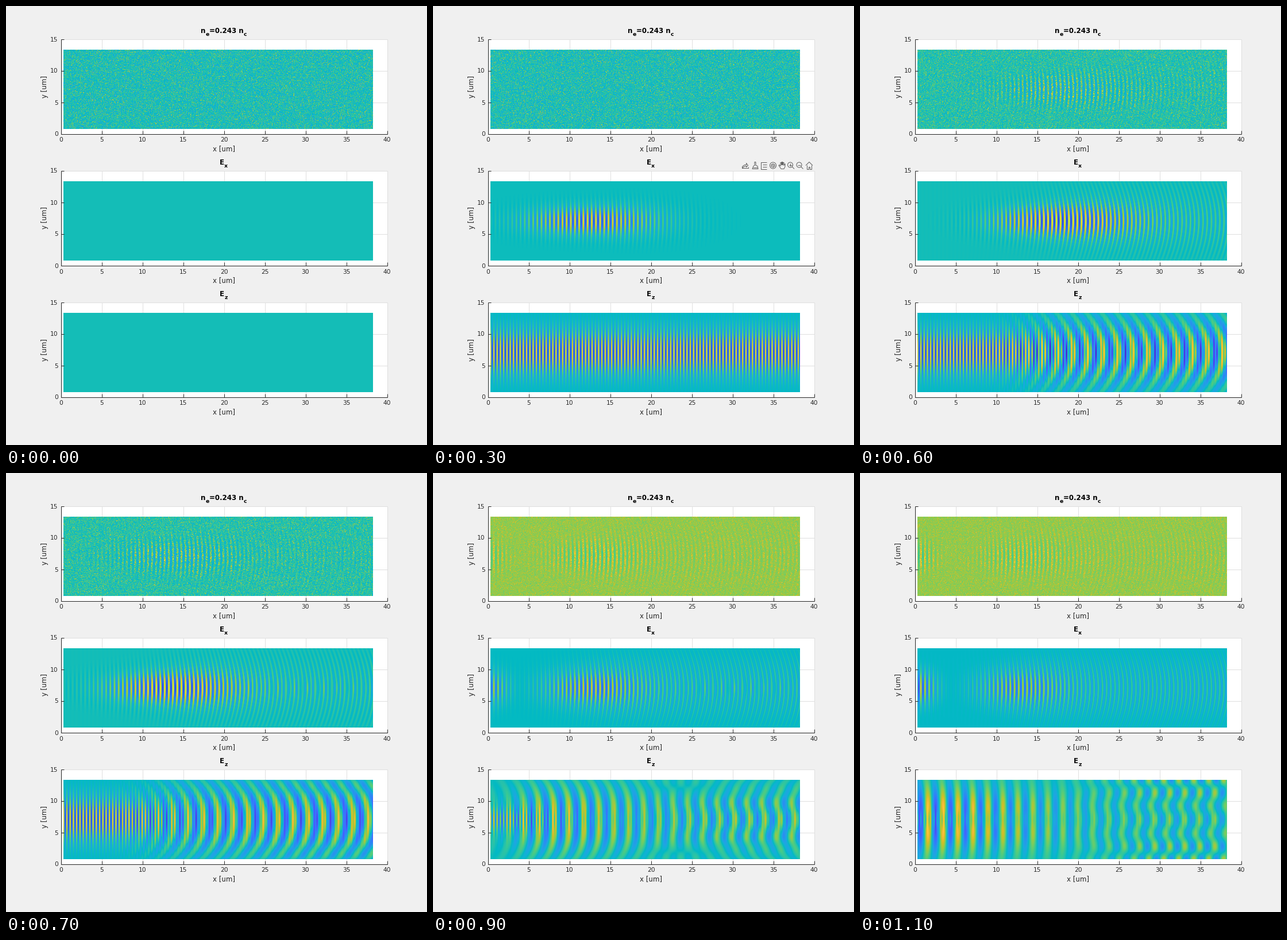
Write a matplotlib script that moves like this. It is 733 px wide and 764 px high and loops after 1200 ms.

```python
import numpy as np
import matplotlib.pyplot as plt
from matplotlib.animation import FuncAnimation
from matplotlib.colors import LinearSegmentedColormap
from matplotlib.patches import Circle, Rectangle

W, H, DPI = 733, 764, 100
PX = 72 / DPI
FRAMES, STEP_MS = 12, 100
LEFT, RIGHT, BOX_H = 95.5, 663.5, 165
TOPS = [57.5 + 229 * k for k in range(3)]
IMG_X, IMG_W, IMG_H = 100, 539, 138
SCALE = (RIGHT - LEFT) / 40
DARK, GRID, ICON = "#262626", "#dfdfdf", "#606060"

plt.rcParams["font.family"] = "DejaVu Sans"
CMAP = LinearSegmentedColormap.from_list("sea", ["#" + c for c in (
    "3e26a8 4332cb 4741e5 4852f4 4563fd 3875fe 2e87f7 2797eb 20a5e3 12b1d6 "
    "02bac3 24c1ae 37c897 57cc7a 81cc59 abc739 d1bf27 f0ba36 fec338 fad62d "
    "f5e924 f9fb15").split()], N=256)

# Wavelengths in pixels: pump, scattered light, plasma wave (k adds up)
PUMP, SCATTER = 5.7, 26.1
PLASMA = 1 / (1 / PUMP - 1 / SCATTER)

px = (IMG_X + np.arange(IMG_W) + .5)[None, :]
x = (px - LEFT) / SCALE
dy = np.abs(np.linspace(6.3, -6.3, IMG_H))[:, None]


def ramp(i, a, b):
    t = np.clip((i - a) / (b - a), 0, 1)
    return t * t * (3 - 2 * t)


def bell(d, w):
    return np.exp(-(d / w) ** 2)


def step(d, w):
    return .5 + .5 * np.tanh(d / w)


def wave(pos, length, peak=0):
    return np.cos(2 * np.pi * (pos - peak) / length)


def plasma_wave(i):
    """Longitudinal field: main packet, entrance stripes, outgoing tail."""
    late, surge = ramp(i, 7, 10), bell(i - 5.2, 1.2)
    d = x - 12 - 7 * surge
    bent = px + (.1 + .15 * ramp(i, 3, 6)) * np.clip(x / 14 - .2, 0, 1.4) * dy ** 2
    stripes = wave(bent, PLASMA, 240)
    width = np.where(d < 0, 7 - 2.5 * late, 8 + 3 * surge - 2 * late)
    spread = 1.9 + .08 * i + .04 * np.clip(d, 0, 20)
    main = (.42 * ramp(i, 0, 3) - .18 * late) * bell(d, width) * bell(dy, spread)
    tail = .09 * ramp(i, 3, 6) * step(d, 4) * bell(dy, 4.8)
    inlet = .4 * late * bell(x, 2.5) * bell(dy, 2.6) * wave(px, PLASMA, 106)
    outlet = (.12 * bell(i - 8, 1) * bell(x - 30, 8) * bell(dy, 1.3)
              * (wave(px, PUMP, 474) + wave(px, SCATTER / 2, 474)))
    return (main + tail) * stripes + inlet + outlet


def light(i):
    """Transverse field: depleted pump, scattered wave and side modes."""
    late, end = ramp(i, 7, 10), ramp(i, 8, 10)
    rest = 1 - .82 * ramp(i, 3.5, 7)
    reach = 600 / max(i, 1) ** 2
    pump = (.42 - .27 * end) * np.clip((26 * i - x) / 2, 0, 1)
    pump = pump * (rest + (1 - rest) * step(reach - x, 4))
    pump = pump * bell(dy, 3.4 - 1.8 * late) * wave(px, PUMP, 106)

    peak = np.interp(i, [5, 6, 10, 11], [331, 345, 340, 353.5])
    bend = 2 * (1 - .9 * end) * (dy / 6.3) ** (2 + ramp(i, 6, 8) + end)
    along = 1 - .65 * late * (1 - bell(x, 15))
    along = along * step(x - 18 + .4 * max(i - 3, 0) ** 2, 3.5)
    across = bell(dy, 5.3) * (1 - .35 * late * bell(dy, 1.6))
    scat = (.3 * ramp(i, 3, 5.5) + .13 * late) * along * across
    scat = scat * wave(px + SCALE * bend, SCATTER, peak)

    side = .2 * ramp(i, 6, 9) * np.clip((x - 18) / 12, 0, 1) * (.5 + dy / 12.6)
    side = side * wave(dy, 5.5 - 1.2 * end) * wave(px, SCATTER, peak + 5)
    return pump + scat + side


def density(i, ex):
    mean = np.interp(i, [4, 5, 6, 8, 10, 11], [.51, .43, .53, .54, .84, .69])
    sd = .075 * ((1 - mean) / .48) ** 1.8
    noise = np.random.default_rng(40 + i).gamma(8, 1, (IMG_H, IMG_W))
    noise = (noise - 8) / 8 ** .5
    return mean + sd * noise + .36 * ramp(i, 3, 5) * ex * (1 + .5 * noise)


def fields(i):
    ex, ez = plasma_wave(i), light(i)
    flip = ramp(i, 7, 10) * wave(i, 2)
    return (density(i, ex), .5 - .01 * ramp(i, 0, 3) + .01 * ramp(i, 3, 5)
            + .03 * flip + ex, .5 - .03 * ramp(i, 0, 3) - .04 * flip + ez)


fig = plt.figure(figsize=(W / DPI, H / DPI), dpi=DPI, facecolor="#f0f0f0")
ax = fig.add_axes([0, 0, 1, 1])
ax.axis("off")


def line(xs, ys, color=DARK, z=3):
    return ax.plot(xs, ys, color=color, lw=PX, zorder=z,
                   solid_capstyle="butt")[0]


def label(xp, yp, s, size=10.67, **kw):
    kw = dict(dict(color=DARK, ha="center", va="baseline"), **kw)
    ax.text(xp, yp, s, fontsize=size * PX, **kw)


def title(y, *parts):
    """Parts are (x, text) and alternate between normal and subscript."""
    for k, (xp, s) in enumerate(parts):
        sub = k % 2
        label(xp, y + 5 * sub, s, 9.4 if sub else 11.7, ha="left",
              weight="bold", color="black")


def panel(top):
    bottom = top + BOX_H
    ax.add_patch(Rectangle((LEFT, top), RIGHT - LEFT, BOX_H,
                           fc="white", ec="none", zorder=0))
    for v in range(0, 41, 5):
        xp = LEFT + round(v * SCALE)
        line([xp, xp], [top, bottom], GRID, 1)
        line([xp, xp], [bottom, bottom - 5.7])
        label(xp, bottom + 14, str(v))
    for v in range(0, 16, 5):
        yp = bottom - round(v * BOX_H / 15)
        line([LEFT, RIGHT], [yp, yp], GRID, 1)
        line([LEFT, LEFT + 5.7], [yp, yp])
        label(90.7, yp + 4, str(v), ha="right")
    line([LEFT, LEFT], [top, bottom + .5])
    line([LEFT, RIGHT], [bottom, bottom])
    label(379.5, bottom + 29.2, "x [um]", 11.7)
    label(73.5, top + BOX_H / 2, "y [um]", 11.7, rotation=90,
          ha="right", va="center")
    y0 = int(top) + 19
    return ax.imshow(np.zeros((IMG_H, IMG_W)), cmap=CMAP, vmin=0, vmax=1,
                     extent=(IMG_X, IMG_X + IMG_W, y0 + IMG_H, y0),
                     aspect="auto", interpolation="nearest", zorder=2)


def toolbar(y=277.5):
    def path(cx, *pts):
        a = np.array(pts)
        return line(cx + a[:, 0], y + a[:, 1], ICON)

    def ring(cx, cy, r):
        return ax.add_patch(Circle((cx, cy), r, fill=False, ec=ICON, lw=PX,
                                   zorder=4))

    parts = [
        # export arrow
        path(543.5, (-5, 5), (-5, 2), (-1, -1), (2, -1), (2, -4), (5, 0), (2, 3),
             (2, 1), (-2, 2), (-5, 5), (6, 5), (6, 3)),
        # brush
        path(561, (1, -6), (1, 0), (4, 1), (5, 6), (-5, 6), (-3, 1), (-1, 0),
             (-1, -6), (1, -6)),
        path(561, (-4, 3), (4, 3)),
        # data tip
        path(576, (5, -6), (-5, -6), (-5, 6), (5, 6)),
        path(576, (-2, -2), (5, -2)), path(576, (-2, 2), (5, 2)),
        # rotate
        ring(592, y, 5.5),
        path(592, (0, -3), (3, -1), (3, 2), (0, 3), (-3, 2), (-3, -1), (0, -3)),
        path(592, (-3, -1), (0, 0), (3, -1)), path(592, (0, 0), (0, 3)),
        # hand
        path(608, (-2, 6), (-6, 0), (-5, -1), (-3, 1), (-3, -5), (-1, -5),
             (-1, -1), (-1, -6), (1, -6), (1, -1), (1, -5), (3, -5), (3, 0),
             (5, -3), (5, 2), (3, 6), (-2, 6)),
        # home
        path(655, (-6, 0), (0, -6), (6, 0)),
        path(655, (-4, -1), (-4, 6), (-1, 6), (-1, 2), (1, 2), (1, 6),
             (4, 6), (4, -1)),
        # zoom in and out
        path(622, (0, -3.5), (0, 1.5)),
    ]
    for cx in (622, 637.5):
        parts += [ring(cx, y - 1, 4.5), path(cx, (3, 2), (7, 6)),
                  path(cx, (-2.5, -1), (2.5, -1))]
    return parts


images = [panel(t) for t in TOPS]
title(47, (339.3, "n"), (347.6, "e"), (354, "=0.243 n"), (413.3, "c"))
title(276, (372, "E"), (380, "x"))
title(505, (372.3, "E"), (380.3, "z"))
tools = toolbar()
ax.set_xlim(0, W)
ax.set_ylim(H, 0)


def draw(i):
    for im, data in zip(images, fields(i)):
        im.set_data(np.clip(data, 0, 1))
    for t in tools:
        t.set_visible(i == 3)
    return images + tools


anim = FuncAnimation(fig, draw, frames=FRAMES, interval=STEP_MS, repeat=True,
                     repeat_delay=0, blit=False)
plt.show()
```
